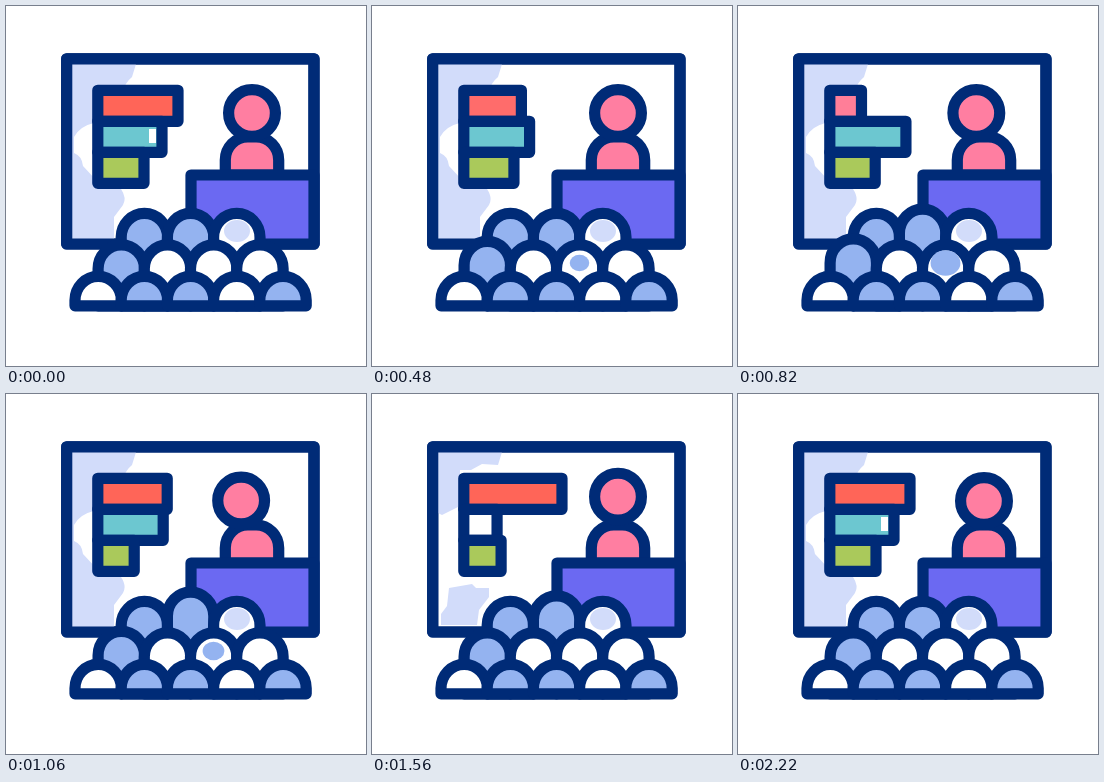
These frames come from a looping animation (360 px wide and 360 px high, 2.4 s). An HTML page:

```html
<!DOCTYPE html>
<html lang="en">
<head>
<meta charset="utf-8">
<title>Presentation</title>
<style>
html, body { margin: 0; width: 100%; height: 100%; overflow: hidden; background: #fff; }
svg { display: block; width: 100vw; height: 100vh; }
.line { stroke: #002b77; stroke-width: 11.2; stroke-linejoin: round; stroke-linecap: round; }
.tint { fill: #d2dcfa; }
</style>
</head>
<body>
<svg id="stage" viewBox="0 0 360 360"></svg>
<script>
const LOOP = 2400, STEP = 20, REST = 220, MOVE = 2000;
const BLUE = '#94b3f0', WHITE = '#fff', PINK = '#ff7ea1';
const LEFT = 91.8, TOP = 84.3, ROW = 31;
const stage = document.getElementById('stage');

function set(el, attrs) {
  for (const k in attrs) el.setAttribute(k, attrs[k]);
}
function add(tag, attrs, parent = stage) {
  const el = document.createElementNS('http://www.w3.org/2000/svg', tag);
  set(el, attrs);
  return parent.appendChild(el);
}
const clamp = x => Math.min(1, Math.max(0, x));

// Eases from 0 up to 1 and back while p runs from a to b.
const bump = (p, a, b) => Math.sin(Math.PI * clamp((p - a) / (b - a))) ** 2;

// Screen and its tinted areas
const screen = { class: 'line', x: 60.7, y: 52.8, width: 247.3, height: 185.2 };
add('rect', { ...screen, fill: WHITE });
const TOP_TINT = 'M66 58H130L126 71';
const whole = add('path', { class: 'tint', d: TOP_TINT + 'Q120 76 117 84H88V117Q74 120 68 131V147Q76 150 77 160L90 174V183H115Q121 192 117 199L108 211V233H66Z' });
const parts = add('path', { class: 'tint', d: TOP_TINT + 'L110 70L99 76H88V112L70 121L66 119ZM77 194L100 190L104 194H117V203L107 216L105 231H69V220L75 212Z' });
add('rect', { ...screen, fill: 'none' });

// Chart: each bar has a moving right edge and a fill that depends on it
const pale = color => right => right < 128 ? WHITE : color;
function warm(right) {
  const k = clamp((160 - right) / 37);
  return `rgb(255 ${101 + 25 * k} ${88 + 65 * k})`;
}
const bars = [
  { right: p => 172 - 52 * bump(p, .02, .5) + 19 * bump(p, .36, .9), fill: warm },
  { right: p => 156 + 12 * bump(p, .08, .5) - 31 * bump(p, .36, 1), fill: pale('#6cc7d0') },
  { right: p => 138 + 4 * bump(p, 0, .28) - 16 * bump(p, .26, .82), fill: pale('#aac95b') }
];
const barBox = i => ({ x: LEFT, y: TOP + ROW * i, height: ROW });
bars.forEach((b, i) => b.body = add('rect', barBox(i)));
const gap = add('rect', { y: 123, width: 7, height: 14, fill: WHITE });
bars.forEach((b, i) => b.edge = add('rect', { ...barBox(i), class: 'line', fill: 'none' }));

// Speaker and desk
add('path', { class: 'line', fill: PINK, d: 'M219.3 169V154A22.5 23 0 0 1 242 131H250A22.5 23 0 0 1 272.7 154V169Z' });
const face = add('circle', { class: 'line', r: 23.4, fill: PINK });
add('rect', { class: 'line', x: 185, y: 169, width: 123, height: 69, fill: '#6b69f2' });

// Audience: three rows of domes, back row first
function person(cx, cy, fill) {
  const g = add('g', {});
  add('path', { class: 'line', fill, d: `M${cx - 23.2} 299.8V${cy}a23.2 24 0 0 1 46.4 0V299.8Z` }, g);
  return g;
}
const [back, middle] = [
  [BLUE, BLUE, WHITE],
  [BLUE, WHITE, WHITE, WHITE],
  [WHITE, BLUE, BLUE, WHITE, BLUE]
].map((fills, row) => fills.map((fill, i) =>
  person(138.4 + 46.2 * (i - row / 2), 231.3 + 31.5 * row, fill)));
// Marks are kept inside their dome so that nearer rows cover them.
add('ellipse', { class: 'tint', cx: 231, cy: 225, rx: 13, ry: 11 }, back[2]);
const spot = add('ellipse', { cx: 207.5, cy: 257, fill: BLUE }, middle[2]);

function draw(t) {
  const p = clamp((t - REST) / MOVE);
  const split = p > .42 && p < .74;
  set(whole, { opacity: split ? 0 : 1 });
  set(parts, { opacity: split ? 1 : 0 });

  for (const b of bars) {
    const right = b.right(p);
    set(b.body, { width: right - LEFT, fill: b.fill(right) });
    set(b.edge, { width: right - LEFT });
  }
  set(gap, { x: bars[1].right(p) - 13, opacity: p < .1 || p > .78 ? 1 : 0 });

  set(face, {
    cx: 246 - 11 * bump(p, .13, .67),
    cy: 107 - 4.5 * bump(p, .36, .92)
  });
  const size = 15 * bump(p, -.1, .67) * clamp(p * 20) + 7 * bump(p, .67, 1);
  set(spot, { rx: size, ry: size * .85 });
  set(back[1], { transform: `translate(0 ${-10.5 * bump(p, .15, .85)})` });
  set(middle[0], { transform: `translate(0 ${-6.5 * bump(p, 0, .5)})` });
}

const start = performance.now();
function tick() {
  const t = (performance.now() - start) % LOOP;
  draw(Math.floor(t / STEP) * STEP);
  requestAnimationFrame(tick);
}
tick();
</script>
</body>
</html>
```
